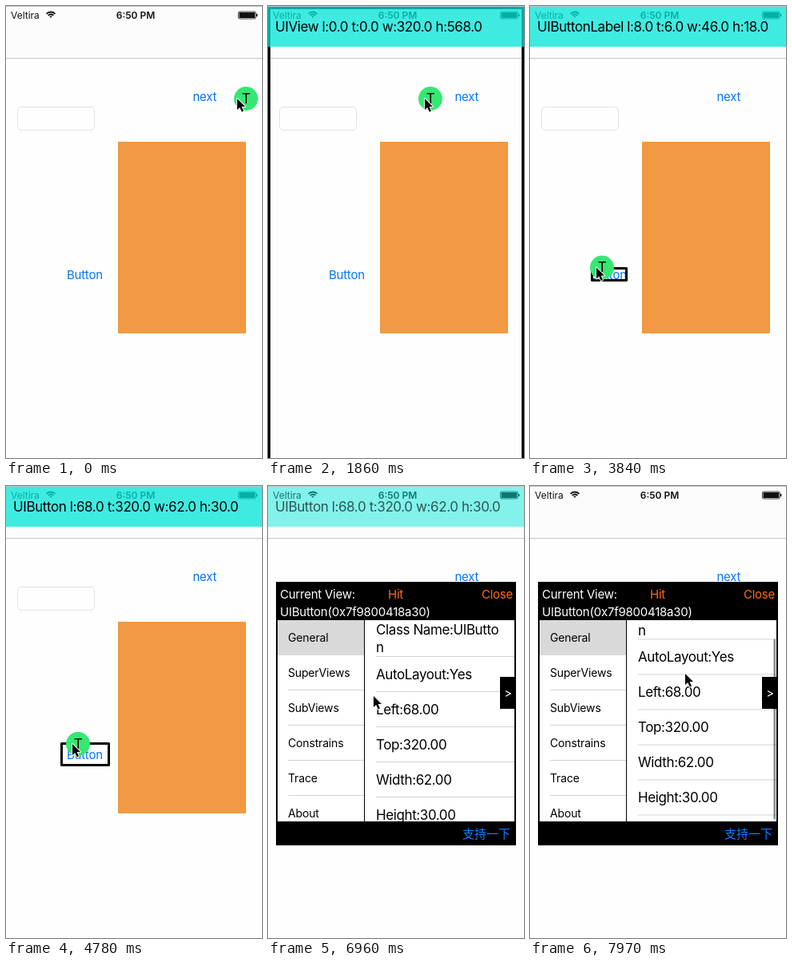
These frames come from a looping animation (320x566 px, 8 s). An HTML page with a canvas:

```html
<!DOCTYPE html>
<html lang="en">
<head>
<meta charset="utf-8">
<title>View inspector</title>
<style>
html, body { margin: 0; width: 100%; height: 100%; overflow: hidden; background: #fefefe; }
canvas { display: block; width: 320px; height: 566px; }
</style>
</head>
<body>
<canvas id="stage"></canvas>
<script>
const W = 320, H = 566, LOOP = 8000, ROW = 44;
const PRESS = 540, DROP = 4250, RELEASE = 5200, OPEN = 5850, SELECT = 6440;
const canvas = document.getElementById('stage');
const ctx = canvas.getContext('2d');
const ratio = window.devicePixelRatio || 1;
canvas.width = W * ratio;
canvas.height = H * ratio;

const BLUE = '#0076f6', HOT = '#ff6a13', LINE = '#d3d3d6';
const SANS = 'Inter, Roboto, sans-serif';
const CJK = '"Noto Sans CJK SC", "Noto Sans CJK JP", "Noto Sans CJK", sans-serif';
const MENU = ['General', 'SuperViews', 'SubViews', 'Constrains', 'Trace', 'About'];

// Stops of the pointer: time, x, y
const POINTER = [
  [PRESS, 289, 116], [1180, 248, 116], [2620, 138, 116], [2790, 138, 116],
  [3840, 83, 327.5], [DROP, 83, 323], [RELEASE, 83, 323], [5610, 138, 25],
  [5960, 138, 25], [6200, 60, 186], [SELECT, 60, 186], [7360, 187, 322], [7970, 194, 235]
];

const clamp = (v, lo, hi) => Math.min(hi, Math.max(lo, v));
const ramp = (t, from, to) => clamp((t - from) / (to - from), 0, 1);

function along(stops, t) {
  const next = stops.findIndex(s => s[0] > t);
  if (next === 0) return stops[0].slice(1);
  if (next < 0) return stops[stops.length - 1].slice(1);
  const a = stops[next - 1], b = stops[next];
  const p = ramp(t, a[0], b[0]);
  return a.slice(1).map((v, i) => v + (b[i + 1] - v) * p);
}

// A button and its centred label; boxes are on screen, frames relative to the parent
function button(title, x, y, padX, padY, width) {
  const height = 18, top = y + 1;
  const frame = [x, y, width + 2 * padX, height + 2 * padY];
  return [
    { name: 'UIButtonLabel', title, frame: [padX, padY, width, height], box: [x + padX, top + padY, width, height] },
    { name: 'UIButton', frame, box: [x, top, frame[2], frame[3]] }
  ];
}

// Frontmost first
const VIEWS = [
  ...button('next', 214, 91, 19.5, 11.5, 29.5),
  ...button('Button', 68, 320, 8, 6, 46),
  { name: 'UIView', frame: [0, 0, 320, 568], box: [0, 1, 320, 568] }
];

function viewAt(px, py) {
  return VIEWS.find(({ box: [x, y, w, h] }) => px >= x && px < x + w && py >= y && py < y + h);
}

function rect(x, y, w, h, color) {
  ctx.fillStyle = color;
  ctx.fillRect(x, y, w, h);
}

function pill(x, y, w, h, r) {
  ctx.beginPath();
  ctx.roundRect(x, y, w, h, r);
}

function text(str, x, y, size, color, { weight = 400, align = 'left', font = SANS } = {}) {
  ctx.font = `${weight} ${size}px ${font}`;
  // Larger text is set tighter
  ctx.letterSpacing = (font === SANS ? -0.08 * Math.max(0, size - 12) : 0) + 'px';
  ctx.textAlign = align;
  ctx.fillStyle = color;
  ctx.fillText(str, x, y);
}

function clip(x, y, w, h, paint) {
  ctx.save();
  ctx.beginPath();
  ctx.rect(x, y, w, h);
  ctx.clip();
  paint();
  ctx.restore();
}

function statusBar() {
  const ink = '#111';
  text('Veltira', 6, 15.5, 12, ink);
  text('6:50 PM', 162, 15.5, 12, ink, { weight: 600, align: 'center' });
  ctx.strokeStyle = ink;
  ctx.lineWidth = 1.8;
  for (let r = 1.5; r < 8; r += 3) {
    ctx.beginPath();
    ctx.arc(56, 15, r, -Math.PI * 0.76, -Math.PI * 0.24);
    ctx.stroke();
  }
  ctx.lineWidth = 0.8;
  pill(290.4, 7, 22, 9, 1.8);
  ctx.stroke();
  rect(291.5, 8, 19.8, 7, ink);
  rect(313, 10, 1.4, 3, ink);
}

function page() {
  rect(0, 0, W, H, '#fefefe');
  rect(0, 0, W, 65, '#fcfcfc');
  rect(0, 0, W, 1, '#c4c4c4');
  rect(0, 65, W, 1, '#c6c6c8');
  statusBar();
  for (const { title, box: [x, y] } of VIEWS) {
    if (title) text(title, x, y + 15, 15, BLUE);
  }
  rect(140, 170, 160, 240, '#f29943');
  ctx.strokeStyle = '#e3e3e3';
  ctx.lineWidth = 1;
  pill(14.5, 126.5, 96, 29, 4.5);
  ctx.stroke();
}

function outline([x, y, w, h]) {
  ctx.strokeStyle = '#000';
  ctx.lineWidth = 3;
  ctx.strokeRect(x + 1.5, y + 1.5, w - 3, h - 3);
}

function ball(x, y) {
  ctx.fillStyle = '#34e872';
  ctx.beginPath();
  ctx.arc(x, y, 15, 0, Math.PI * 2);
  ctx.fill();
  text('T', x, y + 5.5, 17, '#000', { align: 'center' });
}

function banner(view, alpha) {
  ctx.globalAlpha = alpha;
  rect(0, 1, W, 50, 'rgba(0, 230, 216, 0.75)');
  const frame = view.frame.map((v, i) => 'ltwh'[i] + ':' + v.toFixed(1));
  text(view.name + ' ' + frame.join(' '), 9, 32, 17, '#000');
  ctx.globalAlpha = 1;
}

function menu(selected) {
  if (selected) rect(12, 168, 108, ROW, '#d9d9d9');
  MENU.forEach((label, i) => {
    const y = 168 + i * ROW;
    text(label, 25, y + 27, 14, '#000');
    if (i || !selected) rect(25, y + 43, 95, 1, LINE);
  });
}

function facts(view, scroll, barAlpha) {
  const top = 168 - scroll;
  const sizes = ['Left', 'Top', 'Width', 'Height'].map((key, i) => `${key}:${view.frame[i].toFixed(2)}`);
  text('Class Name:UIButto', 135, top + 18, 17, '#000');
  text('n', 135, top + 40, 17, '#000');
  rect(135, top + 45, 173, 1, LINE);
  ['AutoLayout:Yes', ...sizes].forEach((label, i) => {
    const y = top + 45.5 + i * ROW;
    text(label, 135, y + 28, 17, '#000');
    rect(135, y + 43.5, 173, 1, LINE);
  });
  // The bar shrinks by the amount of overscroll
  const max = 13.5, over = Math.abs(scroll - clamp(scroll, 0, max));
  ctx.fillStyle = `rgba(0, 0, 0, ${0.45 * barAlpha})`;
  pill(304.5, 170 + Math.max(0, scroll), 2.5, 234 - over, 1.25);
  ctx.fill();
}

function panel(view, t) {
  const scroll = -12 * ramp(t, 7200, 7360) + 33.5 * ramp(t, 7410, 7970);
  rect(10, 120, 300, 330, '#000');
  rect(12, 168, 108, 252, '#fff');
  rect(121, 168, 187, 252, '#fff');
  text('Current View:', 15, 140.5, 15, '#fff');
  text('Hit', 150, 140.5, 15, HOT);
  text('Close', 267, 140.5, 15, HOT);
  text('UIButton(0x7f9800418a30)', 15, 163, 15, '#fff');
  clip(12, 168, 108, 252, () => menu(t >= SELECT));
  clip(121, 168, 187, 252, () => facts(view, scroll, ramp(t, 7200, 7300)));
  rect(290, 239, 20, 40, '#000');
  text('>', 300, 265, 15, '#fff', { align: 'center' });
  text('支持一下', 243, 440.5, 15, '#0a80ff', { font: CJK });
}

function pointer(x, y) {
  const arrow = new Path2D(`M${x} ${y}v14l3.2-3 2.5 5.6 2.3-1-2.4-5.6h4.4z`);
  ctx.lineJoin = 'round';
  ctx.lineWidth = 1.8;
  ctx.strokeStyle = '#fff';
  ctx.stroke(arrow);
  ctx.fillStyle = '#000';
  ctx.fill(arrow);
}

function draw(t) {
  const [hx, hy] = along(POINTER, Math.min(t, DROP));
  const bx = hx + 11 - 4 * ramp(t, PRESS, 1180);
  const view = viewAt(bx, hy);
  ctx.setTransform(ratio, 0, 0, ratio, 0, 0);
  page();
  if (t >= PRESS && t < RELEASE) outline(view.box);
  ball(bx, hy);
  banner(view, ramp(t, PRESS, 780) - ramp(t, 6800, 7260));
  if (t >= OPEN) panel(view, t);
  pointer(...along(POINTER, t));
}

const start = performance.now();
function tick() {
  draw((performance.now() - start) % LOOP);
  requestAnimationFrame(tick);
}
tick();
</script>
</body>
</html>
```
